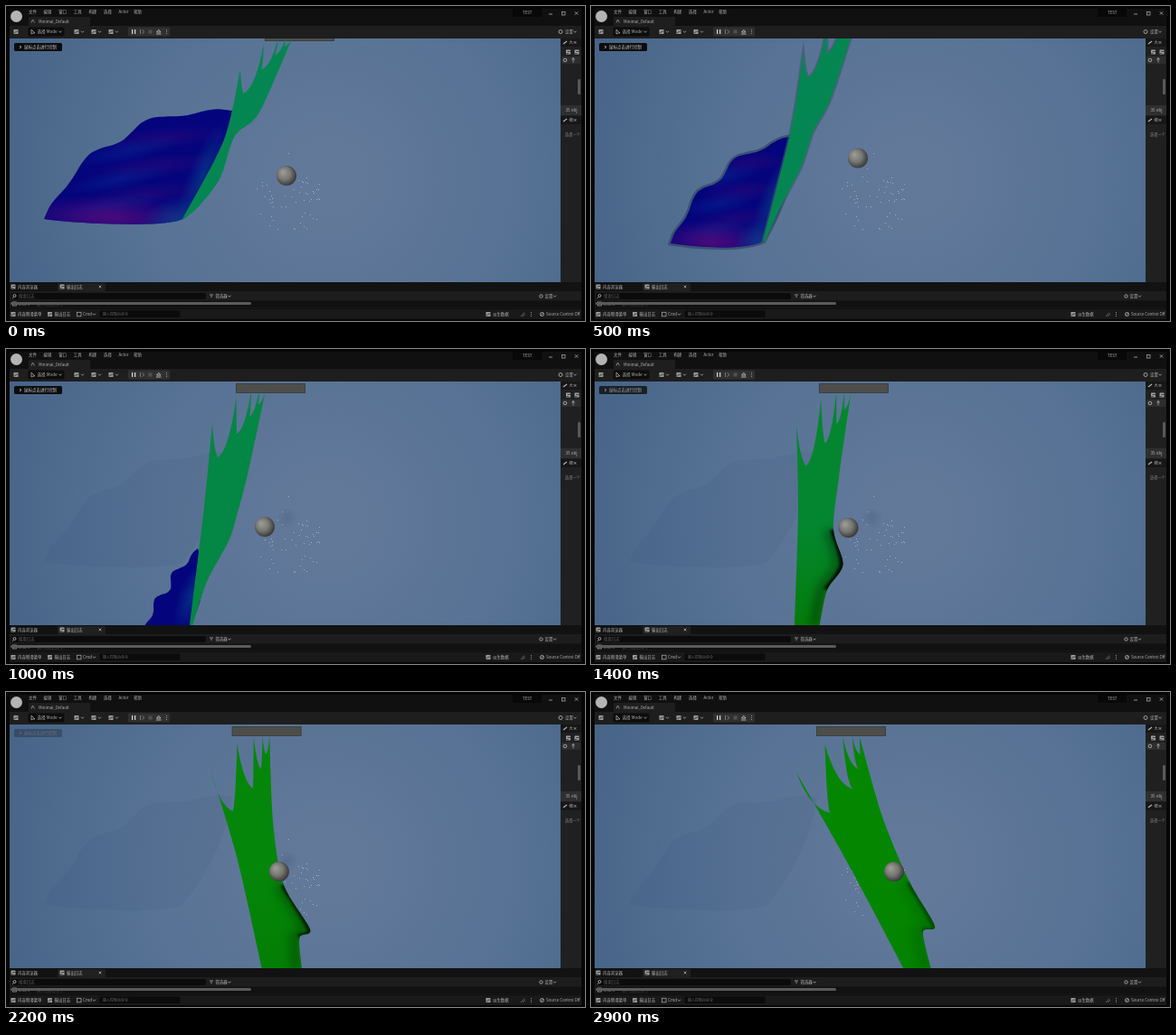
Write an HTML page with a canvas that moves like this. It is 640x349 px and loops after 3 s.

```html
<!DOCTYPE html>
<html lang="zh">
<head>
<meta charset="utf-8">
<title>Cloth viewport</title>
<style>
  html, body { margin: 0; width: 100%; height: 100%; overflow: hidden; background: #060606; }
  canvas { display: block; width: 100vw; height: 100vh; }
</style>
</head>
<body>
<canvas id="stage" width="640" height="349"></canvas>
<script>
const ctx = document.getElementById('stage').getContext('2d');
const LOOP = 3000, STEP = 100;
const VIEW = { x: 4, y: 36, w: 609, h: 270 };
const FONT = '"Noto Sans CJK SC", "Noto Sans CJK", Roboto, sans-serif';

// Key points: left edge pin-mid-foot, right edge corner-hip-waist-fold-cuff-hem,
// blue sheet tip-join.
const poses = [
  { t: 0, ball: [310, 188], bar: [286, 28], pin: [259, 70], mid: [241, 148], foot: [195, 236],
    corner: [317, 34], hip: [280, 118], waist: [253, 144], fold: [237, 190], cuff: [215, 220], hem: [196, 237],
    tip: [42, 236], join: [250, 116] },
  { t: 1000, ball: [286, 197], bar: [254, 38], pin: [228, 83], mid: [219, 175], foot: [203, 307],
    corner: [287, 46], hip: [268, 135], waist: [255, 185], fold: [246, 213], cuff: [222, 258], hem: [206, 307],
    tip: [152, 311], join: [212, 221] },
  { t: 1800, ball: [283, 199], bar: [250, 38], pin: [226, 86], mid: [239, 180], foot: [247, 307],
    corner: [288, 50], hip: [280, 150], waist: [281, 215], fold: [311, 265], cuff: [300, 276], hem: [299, 307],
    tip: [260, 460], join: [250, 420] },
  { t: 2900, ball: [335, 199], bar: [249, 38], pin: [227, 89], mid: [284, 190], foot: [346, 307],
    corner: [297, 50], hip: [322, 138], waist: [352, 210], fold: [380, 259], cuff: [367, 266], hem: [376, 307],
    tip: [260, 460], join: [250, 420] }
];

const unit = v => Math.max(0, Math.min(1, v));
const mix = (a, b, u) => a + (b - a) * u;
const mixPt = (a, b, u) => [mix(a[0], b[0], u), mix(a[1], b[1], u)];
const rgba = (c, a = 1) => `rgba(${c.map(Math.round).join()},${a})`;

// The camera sways up and left and back during the first second.
function poseAt(t) {
  const i = poses.findIndex((p, k) => k > 0 && t <= p.t), a = poses[i - 1], b = poses[i];
  const u = (t - a.t) / (b.t - a.t), sway = t < 1000 ? Math.sin(Math.PI * t / 1000) : 0;
  const pose = {};
  for (const name of Object.keys(a)) {
    if (name === 't') continue;
    const [x, y] = mixPt(a[name], b[name], u);
    pose[name] = [x - (name === 'ball' ? 3 : 9) * sway, y - 24 * sway * unit((330 - y) / 130)];
  }
  return pose;
}

// Smooth curve through points, continuing from the first one
function curve(path, p) {
  for (let i = 0; i < p.length - 1; i++) {
    const a = p[i - 1] || p[i], b = p[i], c = p[i + 1], d = p[i + 2] || c;
    path.bezierCurveTo(b[0] + (c[0] - a[0]) / 7, b[1] + (c[1] - a[1]) / 7,
      c[0] - (d[0] - b[0]) / 7, c[1] - (d[1] - b[1]) / 7, c[0], c[1]);
  }
}

function clothPath(t, { pin, mid, foot, corner, hip, waist, fold, cuff, hem }) {
  const path = new Path2D();
  const tips = [0, .45, .73, .88, 1].map(f => [
    mix(pin[0], corner[0], f),
    mix(corner[1], pin[1], (1 - f) ** 1.5) - 8 * Math.sin(Math.PI * f)
  ]);
  const lean = (a, b) => (b[0] - a[0]) / (b[1] - a[1]);
  const leanL = lean(pin, mid), leanR = lean(corner, hip);
  const sag = 27 + 18 * unit((t - 500) / 900);
  const bend = (a, b) => [mix(a[0], b[0], .6), mix(a[1], b[1], .12)];

  path.moveTo(...foot);
  curve(path, [foot, mid, pin]);
  for (let i = 0; i < 4; i++) {
    const [a, b] = [tips[i], tips[i + 1]], drop = sag * [1, 1.1, .8, .45][i];
    const low = [mix(a[0], b[0], .37) + drop * mix(leanL, leanR, i / 3), a[1] + drop];
    path.quadraticCurveTo(...bend(low, a), ...low);
    path.quadraticCurveTo(...bend(low, b), ...b);
  }
  curve(path, [corner, hip, waist, fold, cuff, hem]);
  path.closePath();
  return path;
}

// Straight line from tip to join, bulged and rippled along its normal
function sheetPath(t, { tip, join, foot }) {
  const path = new Path2D(), rim = [];
  const dx = join[0] - tip[0], dy = join[1] - tip[1], len = Math.hypot(dx, dy);
  for (let u = 0; u < 1.001; u += 1 / 18) {
    const s = Math.sin(Math.PI * Math.min(u, 1));
    const out = (37 - 32 * unit(t / 1000)) * s ** .8 + 5 * s * Math.sin(2 * Math.PI * (3 * u - .71));
    rim.push([tip[0] + dx * u + out * dy / len, tip[1] + dy * u - out * dx / len]);
  }
  path.moveTo(...tip);
  curve(path, rim);
  const [mx, my] = mixPt(join, foot, .5);
  path.quadraticCurveTo(mx + 20, my, ...foot);
  path.bezierCurveTo(foot[0] - 22, foot[1] + 11, tip[0] + 25, tip[1] + 4, ...tip);
  path.closePath();
  return path;
}

function blob(x, y, rx, ry, turn, color, alpha) {
  ctx.save();
  ctx.translate(x, y);
  ctx.rotate(turn);
  ctx.scale(rx, ry);
  const g = ctx.createRadialGradient(0, 0, 0, 0, 0, 1);
  g.addColorStop(0, rgba(color, alpha));
  g.addColorStop(1, rgba(color, 0));
  ctx.fillStyle = g;
  ctx.fillRect(-1, -1, 2, 2);
  ctx.restore();
}

function drawBack(ghost) {
  const g = ctx.createRadialGradient(355, 190, 20, 355, 190, 400);
  g.addColorStop(0, '#63799a');
  g.addColorStop(.45, '#587395');
  g.addColorStop(1, '#456387');
  ctx.fillStyle = g;
  ctx.fillRect(VIEW.x, VIEW.y, VIEW.w, VIEW.h);
  if (ghost) {
    ctx.fillStyle = 'rgba(40,62,96,.07)';
    ctx.fill(sheetPath(0, poses[0]));
    blob(311, 187, 12, 12, 0, [45, 65, 98], .2);
  }
  let seed = 11;
  const rnd = () => (seed = seed * 16807 % 2147483647) / 2147483647;
  ctx.fillStyle = 'rgba(205,211,214,.6)';
  ctx.fillRect(312, 163, 1, 1);
  for (let i = 0; i < 58; i++) {
    const a = rnd() * Math.PI * 2, r = Math.sqrt(rnd());
    ctx.fillRect(Math.round(312 + 38 * r * Math.cos(a)), Math.round(214 + 39 * r * Math.sin(a)), 1, 1);
  }
}

function drawSheet(t, pose, halo) {
  const path = sheetPath(t, pose), { tip, join, foot } = pose;
  const warm = unit(1 - (t - 500) / 400), w = join[0] - tip[0], h = tip[1] - join[1];
  ctx.strokeStyle = `rgba(48,70,102,${.7 * halo})`;
  ctx.lineWidth = 5;
  ctx.stroke(path);
  ctx.save();
  ctx.clip(path);
  ctx.fillStyle = '#04047c';
  ctx.fillRect(0, 0, 640, 349);
  if (warm > 0) {
    for (let i = 0; i < 3; i++) {
      const x = tip[0] + w * (.65 - .05 * i), y = join[1] + h * (.25 + .26 * i);
      blob(x, y, w * .36, h * .11, -.1, [56, 10, 118], .45 * warm);
      blob(x - w * .2, y + h * .12, w * .3, h * .1, -.2, [8, 34, 146], .6 * warm);
    }
    blob(tip[0] + w * .35, tip[1] - 2, w * .5, h * .2, .03, [78, 10, 122], .95 * warm);
    blob(foot[0] - w * .04, foot[1], w * .2, h * .2, -.4, [14, 60, 140], .8 * warm);
  }
  const [mx, my] = mixPt(join, foot, .6);
  blob(mx, my, 16, Math.hypot(join[0] - foot[0], join[1] - foot[1]) * .5, .4, [8, 62, 140], .7);
  ctx.restore();
}

function drawCloth(t, pose, halo) {
  const path = clothPath(t, pose);
  const shade = unit((t - 1000) / 400) * (1 - .6 * unit((t - 1800) / 1100));
  ctx.strokeStyle = `rgba(58,88,108,${.6 * halo})`;
  ctx.lineWidth = 3.5;
  ctx.stroke(path);
  ctx.save();
  ctx.clip(path);
  const blue = 82 * unit(1 - (t - 700) / 1700);
  const g = ctx.createLinearGradient(0, 40, 0, 305);
  g.addColorStop(.6, rgba([4, 134, blue]));
  g.addColorStop(1, rgba([4, 134 - 10 * shade, blue * (1 - .8 * shade)]));
  ctx.fillStyle = g;
  ctx.fillRect(0, 0, 640, 349);
  const crease = (points, dx, width, blur, alpha) => {
    const p = points.map(name => [pose[name][0] + dx, pose[name][1]]);
    ctx.filter = `blur(${blur}px)`;
    ctx.strokeStyle = `rgba(0,12,2,${alpha})`;
    ctx.lineWidth = width;
    ctx.beginPath();
    ctx.moveTo(...p[0]);
    curve(ctx, p);
    ctx.stroke();
  };
  if (shade > 0) {
    crease(['waist', 'fold', 'cuff', 'hem'], -6, 11, 5, .35 * shade);
    crease(['waist', 'fold', 'cuff'], 0, 8, 1.5, shade);
  }
  ctx.restore();
}

function drawBar([x, y]) {
  box(x, y, 77, 11, '#3d3f3f');
  box(x + 1, y + 1, 75, 9, '#4d4e4c');
}

function drawBall([x, y]) {
  const g = ctx.createRadialGradient(x - 4, y - 4, 1, x - 1, y - 1, 13);
  g.addColorStop(0, '#9a9993');
  g.addColorStop(.5, '#777773');
  g.addColorStop(.85, '#454645');
  g.addColorStop(1, '#2b2d2e');
  ctx.fillStyle = g;
  ctx.beginPath();
  ctx.arc(x, y, 11, 0, 7);
  ctx.fill();
}

function box(x, y, w, h, color, r = 0) {
  ctx.fillStyle = color;
  ctx.beginPath();
  ctx.roundRect(x, y, w, h, r);
  ctx.fill();
}

function text(str, x, y, size = 4.4, color = '#b4b4b4') {
  ctx.font = `${size}px ${FONT}`;
  ctx.textBaseline = 'middle';
  ctx.fillStyle = color;
  ctx.fillText(str, x, y);
}

function line(points, color = '#b0b0b0', width = .8) {
  ctx.strokeStyle = color;
  ctx.lineWidth = width;
  ctx.beginPath();
  for (let i = 0; i < points.length; i += 2) ctx.lineTo(points[i], points[i + 1]);
  ctx.stroke();
}

function ring(x, y, r, color = '#b0b0b0') {
  ctx.strokeStyle = color;
  ctx.lineWidth = .9;
  ctx.beginPath();
  ctx.arc(x, y, r, 0, 7);
  ctx.stroke();
}

const chevron = (x, y) => line([x - 1.5, y - .8, x, y + .8, x + 1.5, y - .8]);
const cross = (x, y, r) => { line([x - r, y - r, x + r, y + r]); line([x + r, y - r, x - r, y + r]); };
const frame = (x, y, s) => { ctx.strokeStyle = '#a0a0a0'; ctx.lineWidth = .8; ctx.strokeRect(x, y, s, s); };
const dots = (x, y) => [-2, 0, 2].forEach(d => box(x, y + d - .5, 1, 1, '#909090'));

function icon(x, y) {
  box(x - 2.5, y - 2.5, 5, 5, '#a0a0a0', .6);
  box(x - 1, y - .8, 3.5, .8, '#262626');
  box(x - 2.5, y + 1, 3, .6, '#262626');
}

function label(str, x, y) {
  icon(x, y);
  text(str, x + 5, y);
}

function drawTop() {
  box(0, 0, 640, 349, '#060606');
  box(4, 3, 632, 19, '#101010');
  box(4, 22, 632, 14, '#1e1e1e');
  box(25, 12, 68, 10, '#1e1e1e', 1);
  box(5, 5, 13, 13, '#b4b4b4', 6.5);
  ['文件', '编辑', '窗口', '工具', '构建', '选择', 'Actor', '帮助']
    .forEach((s, i) => text(s, 25 + i * 16.6, 6.5));
  line([28, 18.5, 29.5, 15, 31.5, 18.5], '#9a9a9a');
  text('Minimal_Default', 36, 17, 4.4);
  box(560, 3, 32, 9, '#080808');
  text('TEST', 571, 7.5, 4.4);
  line([600, 9, 604, 9]);
  frame(614.5, 6.5, 3.5);
  cross(630.5, 8, 1.7);

  icon(11, 28.5);
  box(24.5, 23.5, 40, 10, '#0d0d0d', 1.5);
  line([28, 26, 32, 30, 30, 30, 28, 31, 28, 26]);
  text('选择 Mode', 34.5, 28.5, 4.6);
  chevron(60, 28.5);
  [78, 97, 116].forEach(x => { icon(x, 28.5); chevron(x + 6.5, 28.5); });
  box(135, 23.5, 46, 10, '#303030', 1.5);
  box(139, 26, 1.3, 5, '#d0d0d0');
  box(142, 26, 1.3, 5, '#d0d0d0');
  line([148.5, 26, 148.5, 31], '#8a8a8a');
  line([150.5, 26.5, 153, 28.5, 150.5, 30.5], '#8a8a8a');
  box(157.5, 26.5, 4, 4, '#505050');
  line([166.5, 29, 168.8, 26.3, 171, 29, 166.5, 29], '#d0d0d0');
  line([166, 31, 171.5, 31], '#d0d0d0');
  dots(177, 28.5);
  ring(613, 28.5, 2);
  text('设置', 618, 28.5);
  chevron(629, 28.5);
}

function drawSide() {
  const header = (str, y) => {
    box(613, y - 4.5, 23, 9, '#171717');
    line([616, y + 1.5, 620, y - 1.5], '#b5b5b5', 1.2);
    text(str, 622.5, y, 4);
    cross(629, y, 1.2);
  };
  box(613, 36, 23, 270, '#202020');
  header('大…', 40.5);
  icon(621.5, 51);
  icon(631, 51);
  box(614, 56, 21, 8, '#2d2d2d');
  ring(618, 60, 1.8);
  line([627, 57.5, 627, 62.5]);
  line([625.5, 59.5, 627, 57.5, 628.5, 59.5]);
  box(632, 81, 3, 17, '#585858', 1);
  box(613, 110, 23, 11, '#2f2f2f');
  text('35 obj', 618.5, 115.5, 4.6);
  header('细…', 126.5);
  text('选择一个', 618, 142.5, 4.2, '#858585');
}

function drawBottom() {
  box(4, 306, 632, 10, '#121212');
  box(57, 307, 53, 9, '#202020', 1);
  label('内容浏览器', 8, 311);
  label('输出日志', 62, 311);
  cross(104, 311, 1.3);

  box(4, 316, 632, 19, '#1d1d1d');
  box(5.5, 318, 215.5, 7, '#0b0b0b', 2);
  ring(9.5, 321, 1.5);
  line([8.4, 322.3, 7, 324]);
  text('搜索日志', 14, 321.5, 4.4, '#5f5f5f');
  line([225, 320, 229, 320]);
  line([226, 322, 228, 322]);
  text('筛选器', 231.5, 321.5);
  chevron(247, 321.5);
  ring(591.5, 321.5, 1.7);
  text('设置', 595.5, 321.5);
  chevron(606.5, 321.5);

  box(5, 326.5, 631, 8, '#111');
  frame(7.5, 328, 4);
  text('Cmd ⌄', 13.5, 330.5, 4.2, '#888');
  text('输入控制台命令', 34, 330.5, 4.2, '#444');
  box(5, 328, 266, 3, '#5a5a5a', 1.5);

  box(4, 335.5, 632, 11.5, '#191919');
  label('内容侧滑菜单', 8, 341.5);
  label('输出日志', 48.5, 341.5);
  frame(78.5, 339.3, 4.5);
  text('Cmd', 85, 341.5, 4.6);
  chevron(97.5, 341.5);
  box(103.5, 337.5, 89, 7.5, '#0b0b0b', 1.5);
  text('输入控制台命令', 107, 341.5, 4, '#6a6a6a');
  label('派生数据', 533, 341.5);
  line([569, 344, 573, 339.5], '#777');
  line([571, 344, 574, 341], '#777');
  dots(580, 341.5);
  ring(592.5, 341.5, 2);
  line([591, 343, 594, 340]);
  text('Source Control Off', 597, 341.5, 4.4);
}

function drawView(t) {
  const pose = poseAt(t), toast = unit(1 - (t - 1050) / 1600);
  const halo = t < 1000 ? Math.sin(Math.PI * t / 1000) ** 2 : 0;
  ctx.save();
  ctx.beginPath();
  ctx.rect(VIEW.x, VIEW.y, VIEW.w, VIEW.h);
  ctx.clip();
  drawBack(t >= 600);
  drawBar(pose.bar);
  if (t < 1400) drawSheet(t, pose, halo);
  drawCloth(t, pose, halo);
  drawBall(pose.ball);
  ctx.globalAlpha = toast;
  box(9, 41, 53, 9, '#0b0c0e', 1.5);
  line([15, 44.2, 17, 45.5, 15, 46.8], '#ccc');
  text('鼠标点击进行控制', 20, 45.5, 4.5, '#d0d0d0');
  ctx.restore();
}

let shown = -1;
function tick() {
  const step = Math.floor(performance.now() % LOOP / STEP);
  if (step !== shown) {
    shown = step;
    drawView(step * STEP);
  }
  requestAnimationFrame(tick);
}

drawTop();
drawSide();
drawBottom();
tick();
</script>
</body>
</html>
```
